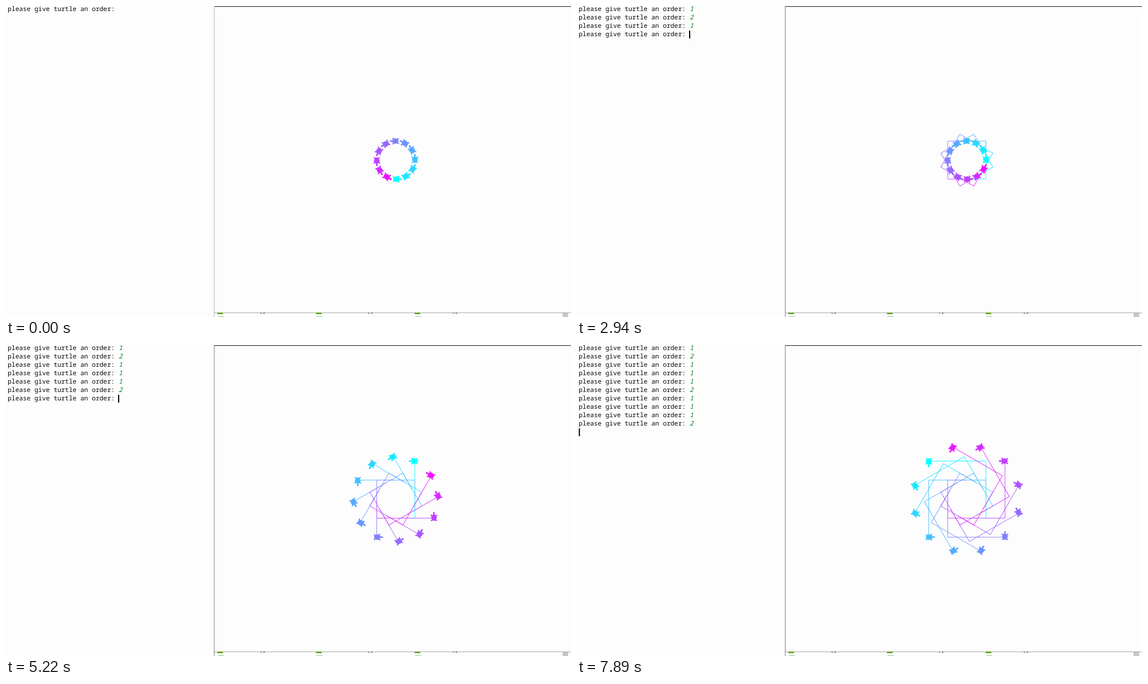
An HTML page with a canvas for the animation above (8000 ms loop, 1008 by 556 pixels).

```html
<!DOCTYPE html>
<html lang="en">
<head>
<meta charset="utf-8">
<title>Turtle orders</title>
<style>
html, body { margin: 0; width: 100%; height: 100%; overflow: hidden; background: #fdfdfd; }
canvas, pre, #cursor { position: absolute; left: 0; top: 0; }
pre {
  margin: 0; left: 3px; top: -2px; color: #080808;
  font: 11.38px/15px "Noto Sans Mono", monospace;
  text-rendering: geometricPrecision;
}
pre i { color: #007f1c; }
#cursor { width: 1.5px; height: 14px; background: #000; }
</style>
</head>
<body>
<canvas id="stage" width="1008" height="556"></canvas>
<pre id="console"></pre>
<div id="cursor"></div>
<script>
const LOOP = 8000, TICK = 30, COUNT = 12, STEP = 34, SCALE = 0.68;
const FOCUS = 570;
const ctx = document.getElementById("stage").getContext("2d");
const consoleText = document.getElementById("console");
const cursor = document.getElementById("cursor");

// Order 1 walks one step, order 2 turns left.
// [order, prompt shown, order entered, first turtle, last turtle]
const orders = [
  [1, 0, 1050, 1110, 1320],
  [2, 1530, 1800, 1830, 1980],
  [1, 2160, 2550, 2580, 2730],
  [1, 2940, 3360, 3390, 3570],
  [1, 3750, 4140, 4140, 4320],
  [2, 4500, 4890, 4890, 5010],
  [1, 5220, 5610, 5610, 5760],
  [1, 5970, 6300, 6330, 6480],
  [1, 6660, 7050, 7095, 7230],
  [2, 7440, 7710, 7740, 7890],
].map(([order, prompt, enter, first, last]) => ({ order, prompt, enter, first, last }));

// Right half of the turtle, from nose to tail
const half = [[0, 16], [2, 14], [1, 10], [4, 7], [7, 9], [9, 8], [6, 5], [7, 1],
  [5, -3], [8, -6], [6, -8], [4, -5], [0, -7]];
const outline = [...half, ...half.slice(1, -1).reverse().map(([x, y]) => [-x, y])];
const turtleShape = new Path2D(
  "M" + outline.map(([x, y]) => `${y * SCALE},${x * SCALE}`).join("L") + "Z");

function rect(color, x, y, w, h) {
  ctx.fillStyle = color;
  ctx.fillRect(x, y, w, h);
}

function drawFrame(t) {
  rect("#fdfdfd", 0, 0, 1008, 556);
  rect(t < FOCUS ? "#b4b4b4" : "#808080", 371, 0, 1, 556);
  rect("#5a5a5a", 372, 0, 636, 1.5);
  rect("#a8a8a8", 372, 548, 636, 1);
  for (const [icon, label] of [[377, 454], [553, 646], [729, 797]]) {
    rect("#69a526", icon, 548, 10, 3);
    rect("#8cc68c", icon + 1, 555, 11, 1);
    rect("#777", label, 548, 2, 2);
    rect("#777", label + 5, 548, 3, 2);
  }
  rect("#c6c6c6", 993, 549, 10, 7);
}

// Runs in the turtle's own frame: ring centre at 0,0, start below it heading right.
function walk(index, t) {
  let x = 0, y = STEP, heading = 0;
  const trail = [[x, y]];
  for (const { order, first, last } of orders) {
    const done = Math.floor(COUNT * (t - first) / (last - first));
    if (done <= index) break;
    if (order === 2) {
      heading -= Math.PI / 2;
    } else {
      x += STEP * Math.cos(heading);
      y += STEP * Math.sin(heading);
      trail.push([x, y]);
    }
  }
  return { x, y, heading, trail };
}

function drawTurtles(t) {
  const turtles = Array.from({ length: COUNT }, (_, i) => walk(i, t));
  const each = draw => turtles.forEach((turtle, i) => {
    const mix = 255 * i / COUNT;
    ctx.save();
    ctx.translate(695.5, 275.5);
    ctx.rotate(-i * 2 * Math.PI / COUNT);
    ctx.fillStyle = ctx.strokeStyle = `rgb(${mix}, ${255 - mix}, 255)`;
    draw(turtle);
    ctx.restore();
  });
  each(({ trail }) => {
    ctx.lineWidth = 0.9;
    ctx.beginPath();
    trail.forEach(([x, y]) => ctx.lineTo(x, y));
    ctx.stroke();
  });
  each(({ x, y, heading }) => {
    ctx.translate(x, y);
    ctx.rotate(heading);
    ctx.lineWidth = 0.8;
    ctx.fill(turtleShape);
    ctx.stroke(turtleShape);
  });
}

function showConsole(t) {
  const shown = orders.filter(o => t >= o.prompt);
  const html = shown.map(o =>
    "please give turtle an order: " + (t >= o.enter ? `<i>${o.order}</i>` : "")).join("\n");
  if (showConsole.last !== html) consoleText.innerHTML = showConsole.last = html;

  const entered = t >= shown[shown.length - 1].enter;
  const row = shown.length - (entered ? 0 : 1);
  cursor.style.display = t < FOCUS ? "none" : "block";
  cursor.style.transform = `translate(${entered ? 3.25 : 200}px, ${row * 15 - 1}px)`;
}

function render() {
  const t = Math.floor(performance.now() % LOOP / TICK) * TICK;
  drawFrame(t);
  drawTurtles(t);
  showConsole(t);
  requestAnimationFrame(render);
}
render();
</script>
</body>
</html>
```
